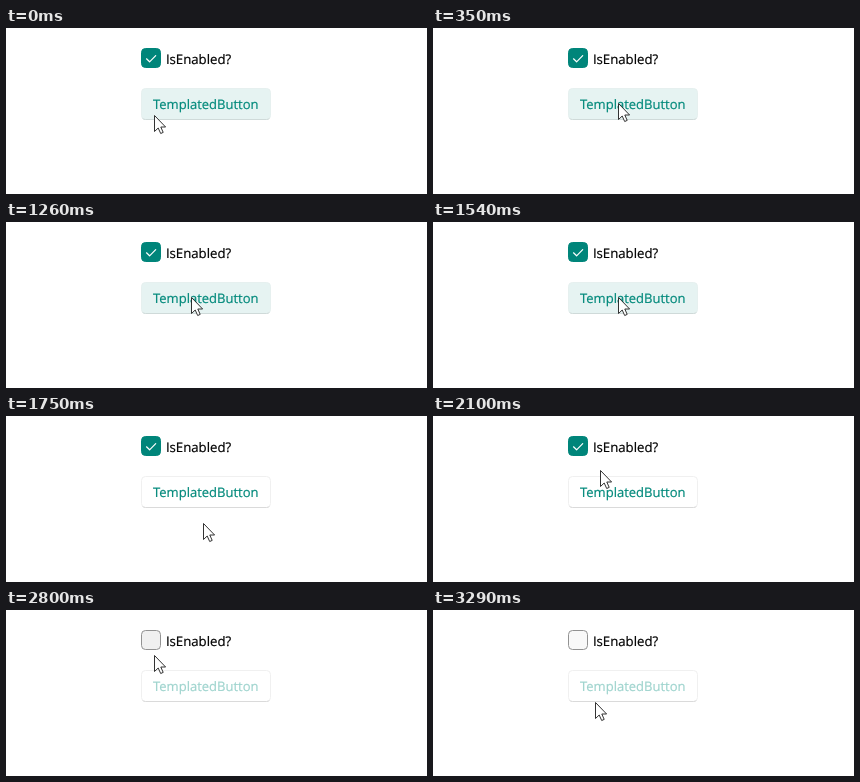
These frames come from a looping animation (421x166 px, 3.78 s). An HTML page:

```html
<!DOCTYPE html>
<html>
<head>
<meta charset="utf-8">
<style>
html, body { margin: 0; width: 100%; height: 100%; overflow: hidden; background: #fff; }
svg { display: block; width: 421px; height: 166px; }
text { font-family: "Open Sans", "Noto Sans", sans-serif; text-rendering: geometricPrecision; stroke-width: .2; }
</style>
</head>
<body>
<svg viewBox="0 0 421 166">
  <rect width="421" height="166" fill="#fff"/>
  <rect id="box" x="135.5" y="20.5" width="19" height="19" rx="4"/>
  <path id="check" d="M140.5 30.8 L143.6 33.8 L149.7 27.7" fill="none" stroke="#fff" stroke-width="1.2" stroke-linecap="round" stroke-linejoin="round"/>
  <text x="159.9" y="36" font-size="13.2" fill="#000" stroke="#000">IsEnabled?</text>
  <rect id="button" x="135.5" y="60.5" width="129" height="31" rx="4"/>
  <path id="edge" d="M136.6 90.4 Q137.6 91.5 139.5 91.5 H260.5 Q262.4 91.5 263.4 90.4" fill="none"/>
  <text id="label" x="147" y="81" font-size="13.03">TemplatedButton</text>
  <path id="cursor" d="M.5 .5 V16.5 L4.2 13 L6.7 18.5 L9.2 17.4 L6.8 12 H11.6 Z" fill="#fff" stroke="#1c1c1c" stroke-width=".9"/>
</svg>
<script>
const LOOP = 3780, STEP = 70, UNCHECK = 2590;
const [box, check, button, edge, label, cursor] =
  ['box', 'check', 'button', 'edge', 'label', 'cursor'].map(id => document.getElementById(id));

// Pointer glides: start, end, and where the tip arrives
const home = [148, 87];
const moves = [
  [0, 350, 185, 75],
  [1540, 1750, 197, 107],
  [1750, 1960, 180, 75],
  [2030, 2100, 167, 54],
  [2100, 2240, 145, 35],
  [2730, 2800, 148, 45],
  [2800, 3080, 178, 101],
  [3080, 3290, 162, 92]
];
// The mouse button alternates between down and up over the button
const clicks = [560, 630, 980, 1120, 1190, 1260, 1330, 1540];

const clamp = v => Math.min(1, Math.max(0, v));
const smooth = k => k * k * (3 - 2 * k);
const set = (node, attrs) => {
  for (const k in attrs) node.setAttribute(k, attrs[k]);
};

function pointer(t) {
  let [x, y] = home;
  for (const [start, end, toX, toY] of moves) {
    const k = smooth(clamp((t - start) / (end - start)));
    x += (toX - x) * k;
    y += (toY - y) * k;
  }
  return [Math.round(x), Math.round(y)];
}

function draw(time) {
  const t = Math.floor((time % LOOP) / STEP) * STEP;
  const [x, y] = pointer(t);
  const enabled = t < UNCHECK;
  const hover = enabled && y >= 60 && y < 92;
  const pressed = clicks.filter(c => c <= t).length % 2 === 1;
  const boxHover = y < 48;
  const boxPressed = enabled && t >= UNCHECK - 2 * STEP;

  const teal = boxPressed ? '#339d92' : boxHover ? '#1a9185' : '#00857a';
  const ink = !enabled ? '#9fd4ce' : pressed ? '#5cb2a8' : '#00897b';
  set(box, enabled
    ? { fill: teal, stroke: teal }
    : { fill: boxHover ? '#f0f0f0' : '#f9f9f9', stroke: '#929292' });
  set(check, { opacity: enabled ? 1 : 0 });
  set(button, { fill: hover ? '#e6f3f2' : '#fff', stroke: hover ? '#e6f0ef' : '#f0f0f0' });
  set(edge, { stroke: hover ? '#cfdad9' : '#dadada' });
  set(label, { fill: ink, stroke: ink });
  set(cursor, { transform: `translate(${x} ${y})` });
}

function frame() {
  draw(performance.now());
  requestAnimationFrame(frame);
}
frame();
</script>
</body>
</html>
```
